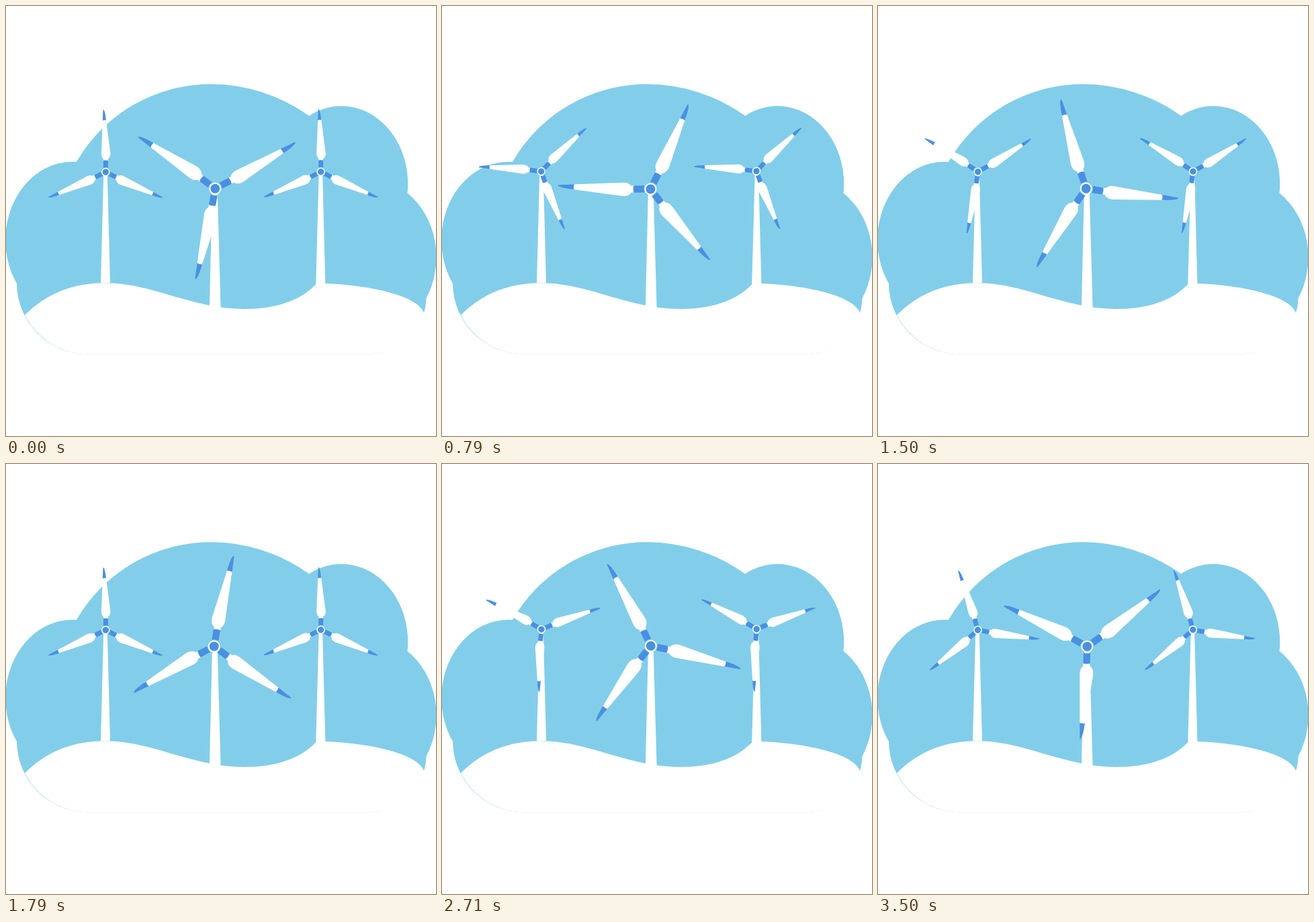
Animation of 640 by 640 pixels, one loop 3.57 s. Source, as an HTML page:

```html
<!DOCTYPE html>
<html lang="en">
<head>
<meta charset="utf-8">
<title>Wind farm</title>
<style>
  html, body { margin: 0; width: 100%; height: 100%; overflow: hidden; background: #fff; }
  svg { display: block; width: 100%; height: 100%; }
  .sky { fill: #82ceea; }
  .white { fill: #fff; }
  .blue { fill: #4a90e2; }
</style>
</head>
<body>
<svg viewBox="0 0 640 640">
  <defs>
    <!-- blade hangs down from the hub, straight edge on the right -->
    <g id="blade">
      <path class="white" d="M-4 24H6V29C10 32 11 36 11 42V114L3.5 114.6L-9 42C-9.5 37 -8 31 -4 29Z"/>
      <path class="blue" d="M-4.8 9.5Q.5 11 5.4 9.2L5.9 25.2Q.5 26.6 -4.4 25.2Z"/>
      <path class="blue" d="M3.5 114.2Q7 115.4 11 113.3V137L10.2 137.6C7.6 136.5 4.8 125 3.5 114.2Z"/>
    </g>
    <g id="rotor">
      <g transform="translate(.8 .2)">
        <use href="#blade" transform="rotate(128.2)"/>
        <use href="#blade" transform="rotate(-115.7)"/>
        <use href="#blade" transform="rotate(8) scale(-1 1)"/>
        <circle class="white" r="9"/>
        <circle class="blue" r="7"/>
      </g>
    </g>
  </defs>

  <path class="sky" d="M105 232A230.4 230.4 0 0 1 305 116.3A250 250 0 0 1 451 163.5
    A99 116 0 0 1 597.5 278.5A100 116 0 0 1 625.5 435A85.5 85.5 0 0 1 540 518.3
    H122A106 106 0 0 1 16 413A100 116.5 0 0 1 105 232Z"/>
  <path class="white" d="M28 460C60 428 100 412.3 147 412.3C220 412.3 275 451 355 451
    C400 451 437 439 460 415.5Q463 412.6 470 412.8C545 415 615 432 622.5 458
    A85.5 85.5 0 0 1 540 518.3H122A106 106 0 0 1 28 460Z"/>

  <path class="white" d="M307 272H314.6L319.6 451H302.8Z"/>
  <path class="white" d="M145.3 248H150.7L155 412H141Z"/>
  <path class="white" d="M465.7 248H471L475.4 415H461.2Z"/>

  <use href="#rotor" id="mid"/>
  <use href="#rotor" id="left"/>
  <use href="#rotor" id="right"/>
</svg>
<script>
  const LOOP = 3570, FPS = 14;

  function place(id, x, y, angle, scale) {
    document.getElementById(id).setAttribute('transform',
      `translate(${x} ${y}) rotate(${angle}) scale(${scale})`);
  }

  // The rotors turn in whole steps: 90 steps in one loop of 50 pictures.
  function draw() {
    const t = Math.floor(performance.now() % LOOP / 10) * 10;
    const pic = Math.floor((t + 4.99) * FPS / 1000);
    const step = Math.round(pic * 1.8);
    place('mid', 310.5, 271.6, step * 4, 1);
    place('left', 148.1, 246.6, step * 8 + 54, 0.675);
    place('right', 468.4, 246.2, step * 8 + 54, 0.675);
    requestAnimationFrame(draw);
  }
  draw();
</script>
</body>
</html>
```
